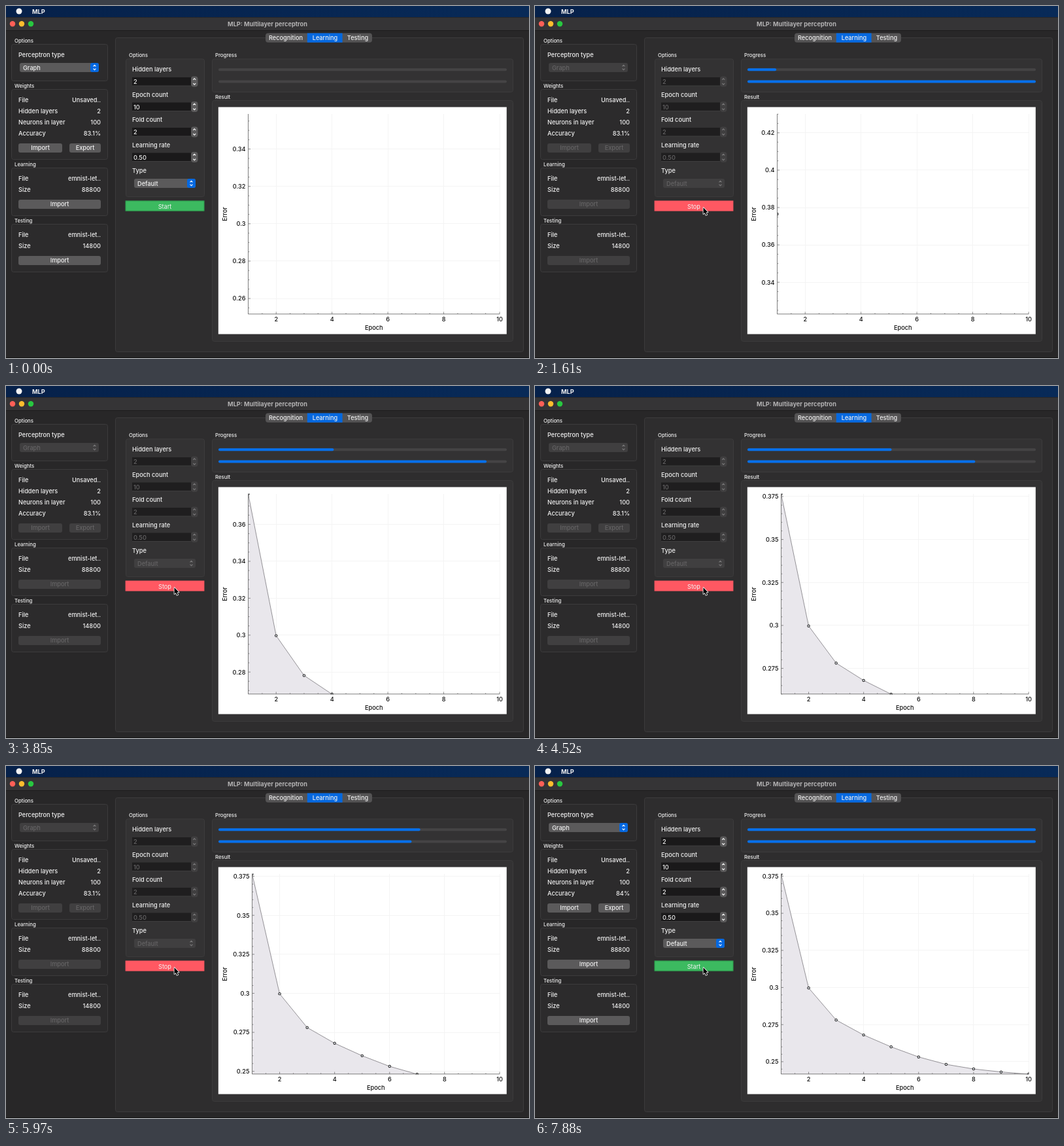
Animation of 800x538 px, one loop 7.91 s. Source, as an HTML page with a canvas:

```html
<!DOCTYPE html>
<html lang="en">
<head>
<meta charset="utf-8">
<title>MLP: Multilayer perceptron</title>
<style>
  html, body { margin: 0; width: 100%; height: 100%; overflow: hidden; background: #282828; }
  canvas { display: block; }
</style>
</head>
<body>
<canvas id="stage" width="800" height="538"></canvas>
<script>
const ctx = document.getElementById('stage').getContext('2d');
const LOOP = 7910, START = 50, DONE = 7780;
const BLUE = '#0670ec', TAB_BLUE = '#0568e0', WHITE = '#f2f2f2', DIM = '#656465', AXIS = '#707070';

// [time in ms, epochs trained]
const PACE = [[START, 0], [1610, 1.998], [2420, 3.03], [3850, 4.93],
              [5180, 6.64], [6760, 8.69], [DONE, 10]];
const ERRORS = [.3765, .2997, .2781, .268, .26, .2532, .2482, .2451, .2431, .2416];

function epochsAt(t) {
  if (t <= START) return 0;
  if (t >= DONE) return 10;
  const i = PACE.findIndex(k => t < k[0]);
  const [t0, e0] = PACE[i - 1], [t1, e1] = PACE[i];
  return e0 + (e1 - e0) * (t - t0) / (t1 - t0);
}

function box(x, y, x2, y2, fill, r = 0, stroke) {
  ctx.beginPath();
  if (stroke) ctx.roundRect(x + .5, y + .5, x2 - x - 1, y2 - y - 1, r);
  else ctx.roundRect(x, y, x2 - x, y2 - y, r);
  ctx.fillStyle = fill;
  ctx.fill();
  if (stroke) { ctx.strokeStyle = stroke; ctx.lineWidth = 1; ctx.stroke(); }
}

function dot(x, y, r, fill) {
  ctx.beginPath();
  ctx.arc(x, y, r, 0, 7);
  ctx.fillStyle = fill;
  ctx.fill();
}

function line(color, width, ...pts) {
  ctx.beginPath();
  pts.forEach(([x, y]) => ctx.lineTo(x, y));
  ctx.strokeStyle = color;
  ctx.lineWidth = width;
  ctx.stroke();
}

// y is the middle of the capitals
function text(s, x, y, { align = 'left', color = WHITE, size = 9.2, weight = 500 } = {}) {
  ctx.font = `${weight} ${size}px Inter, Roboto, sans-serif`;
  ctx.textAlign = align;
  ctx.fillStyle = color;
  ctx.fillText(s, x, y + size * .364);
}

function group(title, x, y, x2, y2, fill) {
  text(title, x + 5, y - 5, { size: 7.8 });
  box(x, y, x2, y2, fill, 3, '#3c3b3c');
}

function chevrons(x, y, gap, color) {
  for (const s of [-1, 1])
    line(color, 1.1, [x - 2, y + s * gap], [x, y + s * (gap + 2)], [x + 2, y + s * gap]);
}

function combo(s, x, y, x2, on) {
  box(x, y, x2, y + 14, on ? '#5b5a5b' : '#403f40', 3);
  if (on) box(x2 - 13, y, x2, y + 14, TAB_BLUE, 3);
  chevrons(x2 - 6.5, y + 7, 1.7, on ? '#fff' : '#7a797a');
  text(s, x + 5, y + 7.3, { color: on ? WHITE : DIM });
}

function button(s, x, y, x2, on) {
  box(x, y, x2, y + 14, on ? '#5b5a5b' : '#403f40', 3);
  text(s, (x + x2) / 2, y + 7, { align: 'center', color: on ? WHITE : DIM });
}

function spin(label, value, y, on) {
  text(label, 193, y - 18.5);
  box(193, y - 6.5, 283, y + 6.5, on ? '#1a191a' : '#1f1e1f');
  line('#3f3e3f', 1, [193, y + 6.5], [283, y + 6.5]);
  text(value, 195, y + .3, { color: on ? WHITE : DIM });
  box(283, y - 8, 293.5, y + 8, on ? '#5b5a5b' : '#403f40', 4);
  chevrons(288.2, y, 2.6, on ? '#fff' : '#7a797a');
}

function rows(y, list) {
  list.forEach(([name, value], i) => {
    text(name, 19, y + i * 17);
    text(value, 145, y + i * 17, { align: 'right' });
  });
}

function bar(y, part) {
  box(325, y - 2, 766, y + 2, '#454445', 2);
  if (part > 0) box(325, y - 2, 325 + 441 * part, y + 2, BLUE, 2);
}

function sidebar(on, accuracy) {
  const fill = '#2c2b2c';
  group('Options', 8, 58, 156, 115, fill);
  text('Perceptron type', 19, 75);
  combo('Graph', 21, 87, 142, on);

  group('Weights', 8, 127, 156, 235, fill);
  rows(144, [['File', 'Unsaved..'], ['Hidden layers', '2'],
             ['Neurons in layer', '100'], ['Accuracy', accuracy]]);
  button('Import', 19, 210, 86, on);
  button('Export', 97, 210, 145, on);

  [['Learning', 247, '88800'], ['Testing', 333, '14800']].forEach(([name, y, size]) => {
    group(name, 8, y, 156, y + 74, fill);
    rows(y + 17, [['File', 'emnist-let..'], ['Size', size]]);
    button('Import', 19, y + 49, 145, on);
  });
}

function settings(on) {
  group('Options', 183, 80.5, 304, 292, '#333233');
  [['Hidden layers', '2'], ['Epoch count', '10'], ['Fold count', '2'], ['Learning rate', '0.50']]
    .forEach(([label, value], i) => spin(label, value, 115.5 + i * 38.5, on));
  text('Type', 193, 251.5);
  combo('Default', 196, 264, 290, on);
  box(182.6, 297.6, 303.4, 313.6, on ? '#3cba60' : '#ff5862');
  if (on) {
    ctx.setLineDash([1, 1]);
    ctx.strokeStyle = '#1f7a3a';
    ctx.lineWidth = 1;
    ctx.strokeRect(183, 298, 120, 15.2);
    ctx.setLineDash([]);
  }
  text(on ? 'Start' : 'Stop', 243, 306.3, { align: 'center', weight: 400 });
}

function chart(count) {
  const top = 165, bottom = 471, right = 755;
  const data = ERRORS.slice(0, count);
  let hi = data[0], lo = data[count - 1];
  if (count < 2) {
    const mid = count ? data[0] : .3052;
    hi = mid + .0536;
    lo = mid - .0536;
  }
  const step = (hi - lo) / 5 > .0225 ? .025 : .02;
  const left = step === .025 ? 376.5 : 370.5;
  const px = e => left + (e - 1) * (right - left) / 9;
  const py = v => bottom - (v - lo) / (hi - lo) * (bottom - top);
  const snap = v => Math.floor(v) + .5;
  const ink = { color: '#111' };

  box(324.8, 154.6, 765.8, 501.6, '#fff');

  const ticks = [];
  for (let i = Math.ceil(lo / .005 - 1e-6); i * .005 <= hi + 1e-6; i++)
    ticks.push([i * .005, i % Math.round(step / .005) === 0]);
  for (const [v, major] of ticks)
    if (major) line('#f4f4f4', 1, [left, snap(py(v))], [right, snap(py(v))]);
  for (let e = 2; e <= 10; e += 2)
    line('#f4f4f4', 1, [snap(px(e)), top], [snap(px(e)), bottom]);

  ctx.save();
  ctx.beginPath();
  ctx.rect(left - .5, top - .5, right - left + 1, bottom - top + 1);
  ctx.clip();
  const pts = data.map((v, i) => [px(i + 1), py(v)]);
  if (count > 1) {
    ctx.beginPath();
    [[left, bottom], ...pts, [px(count), bottom]].forEach(([x, y]) => ctx.lineTo(x, y));
    ctx.fillStyle = '#e9e7ec';
    ctx.fill();
    line('#6a686e', .7, ...pts);
  }
  for (const [x, y] of pts) {
    dot(x, y, 2.2, '#222');
    dot(x, y, 1.2, '#dfe3e8');
  }
  ctx.restore();

  line(AXIS, .9, [left, top], [left, bottom - .2], [right, bottom - .2]);
  for (const [v, major] of ticks) {
    const y = py(v);
    line(AXIS, .8, [left, y], [left + (major ? 3.5 : 1.8), y]);
    if (major) text(String(+v.toFixed(3)), left - 4, y, { ...ink, align: 'right' });
  }
  for (let e = 1; e <= 10; e += .5) {
    const x = px(e), major = e % 2 === 0;
    line(AXIS, .8, [x, bottom], [x, bottom - (major ? 3.5 : 1.8)]);
    if (major) text(String(e), x, 478.5, { ...ink, align: 'center' });
  }
  text('Epoch', (left + right) / 2, 492, { ...ink, align: 'center' });
  ctx.save();
  ctx.translate(335, 318);
  ctx.rotate(-Math.PI / 2);
  text('Error', 0, 0, { ...ink, align: 'center' });
  ctx.restore();
}

function cursor(x, y) {
  ctx.beginPath();
  [[0, 0], [0, 10], [2.3, 8], [3.9, 11.7], [5.6, 11], [4, 7.4], [7, 7.2]]
    .forEach(([dx, dy]) => ctx.lineTo(x + dx, y + dy));
  ctx.closePath();
  ctx.lineJoin = 'round';
  ctx.strokeStyle = '#fff';
  ctx.lineWidth = 1.6;
  ctx.stroke();
  ctx.fillStyle = '#000';
  ctx.fill();
  ctx.lineJoin = 'miter';
}

function desktop() {
  const sky = ctx.createLinearGradient(0, 0, 800, 0);
  sky.addColorStop(0, '#06214a');
  sky.addColorStop(1, '#082a58');
  box(0, 0, 800, 18, sky);
  dot(20, 8, 4.5, '#f4f4f4');
  text('MLP', 40, 8.3, { weight: 700 });
  box(0, 17, 800, 538, '#282728');
  box(0, 18, 800, 37, '#353436');
  line('#1c1b1c', 1, [0, 37.5], [800, 37.5]);
  line('#111', 1, [0, 537.5], [800, 537.5]);
  ['#ff5f57', '#febc2e', '#28c840'].forEach((c, i) => dot(10 + i * 14, 27.3, 4.2, c));
  text('MLP: Multilayer perceptron', 400, 27.3, { align: 'center', weight: 700, color: '#b4b3b4' });
}

function tabs() {
  box(167, 48, 792, 529, '#2e2d2e', 3, '#3c3b3c');
  box(397, 41.4, 560, 55.8, '#545354', 4);
  box(460.8, 41.4, 514.6, 55.8, TAB_BLUE);
  [['Recognition', 428], ['Learning', 488], ['Testing', 538]]
    .forEach(([name, x]) => text(name, x, 49, { align: 'center' }));
}

function draw(t) {
  const idle = t < START || t >= DONE;
  const epochs = epochsAt(t), count = Math.floor(epochs);
  desktop();
  sidebar(idle, t >= DONE ? '84%' : '83.1%');
  tabs();
  settings(idle);
  group('Progress', 315, 80.5, 776, 132, '#333233');
  bar(97.3, count / 10);
  bar(115.4, count === 10 ? 1 : Math.round((epochs - count) * 100) / 100);
  group('Result', 315, 144, 776, 513, '#333233');
  chart(count);
  if (t >= 30) cursor(257.5, 308);
}

const begin = performance.now();
function tick() {
  draw((performance.now() - begin) % LOOP);
  requestAnimationFrame(tick);
}
tick();
</script>
</body>
</html>
```
